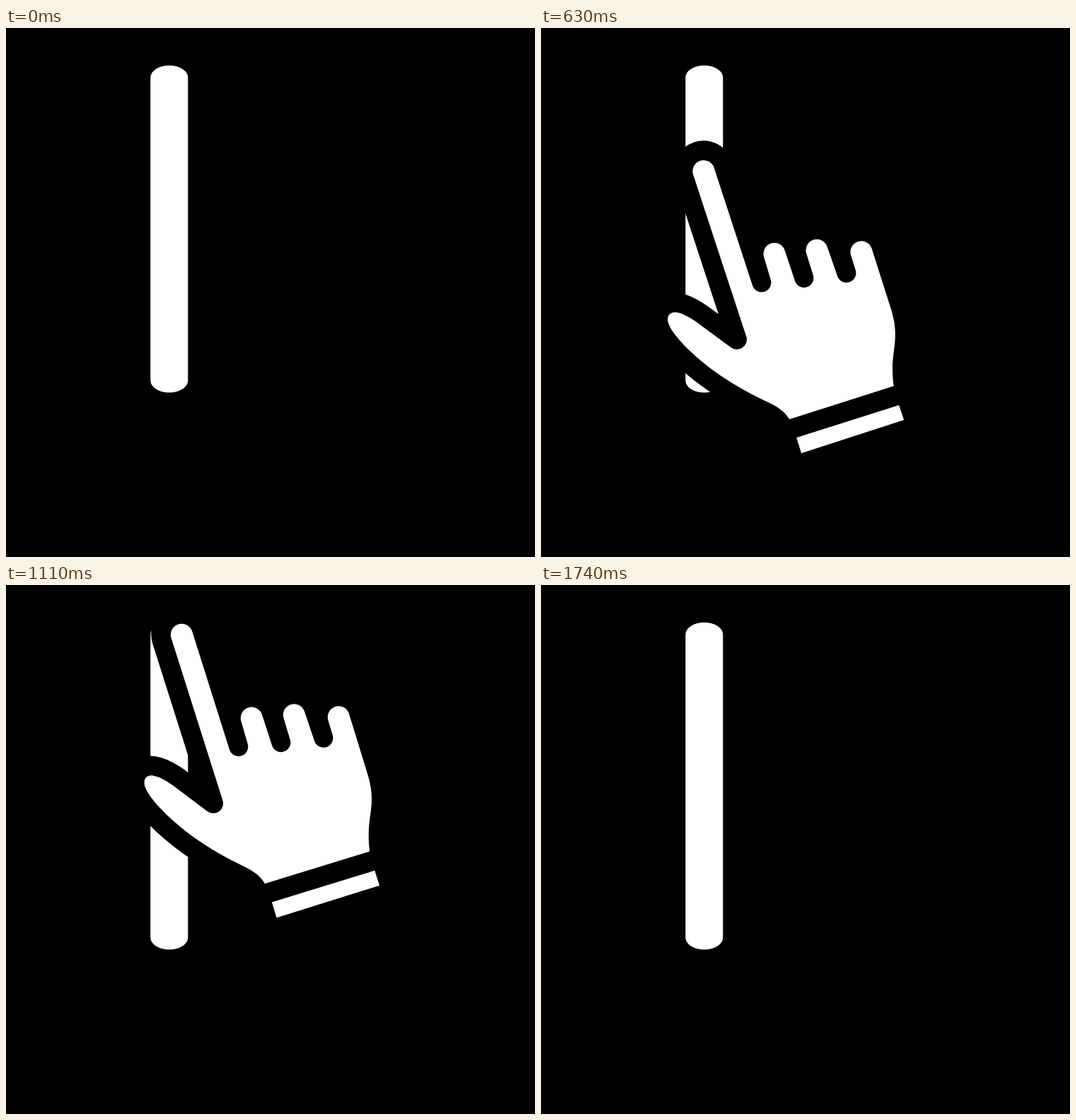
Write an HTML page that moves like this. It is 748 by 748 pixels and loops after 1830 ms.

```html
<!DOCTYPE html>
<html>
<head>
<meta charset="utf-8">
<style>
html, body { margin: 0; height: 100%; overflow: hidden; background: #000; }
svg { display: block; width: 100%; height: 100%; }
#hand { fill: #fff; stroke: #000; stroke-width: 55; stroke-linejoin: round; paint-order: stroke; }
</style>
</head>
<body>
<svg viewBox="0 0 748 748">
  <rect x="204.3" y="53" width="53" height="462.5" rx="26.5" ry="17" fill="#fff"/>
  <g id="hand">
    <path d="M216 256A15.5 15.5 0 0 1 245.5 246.3
      L300.2 413.7A13.5 13.5 0 0 0 325.8 405.3
      L315.8 371.8A15.5 15.5 0 0 1 345.2 362.2
      L360.2 407.2A13.5 13.5 0 0 0 385.8 398.8
      L375.8 366.8A15.5 15.5 0 0 1 405.2 357.2
      L420.2 400.2A13.5 13.5 0 0 0 445.8 391.8
      L438.8 369.3A15.5 15.5 0 0 1 468.2 359.7
      L496 447C502 467 502.5 480 501 495C499 515 496 525 499.5 555
      L352 602C345 591 337 585 320 577C275 556 235 530 203 497
      C188 481 180 469 180 461C180 453 186 449.5 193 451C201 452 211 458 220 464
      L269.5 500.5A14 14 0 0 0 291.3 485.5Z
      M362 628L507 582L514 603L369 650Z"/>
  </g>
</svg>
<script>
const LOOP = 1830, STEP = 30, FADE = 210, END = 1740, TURN = 1110;
const PIVOT = [299.75, 442.5];
const hand = document.getElementById('hand');
const clamp = v => Math.min(1, Math.max(0, v));

// Sideways: a slight drift, a quick start, then a decelerating swipe
function posX(t) {
  if (t >= TURN) {
    const s = t - TURN;
    return 315.5 + 0.3237 * s - 1.98e-4 * s * s;
  }
  const drift = 1.75 * clamp((t - 390) / 510);
  return PIVOT[0] - drift + 0.00216 * Math.max(0, t - 1020) ** 2;
}

// Upwards: accelerate, run evenly, settle at the top
function posY(t) {
  if (t >= TURN) {
    const s = t - TURN;
    return 262.3 - 0.28 * s * Math.exp(-s / 40);
  }
  const rise = t < 630 ? 67.7 * (t / 630) ** 2.65 : 67.7 + 0.2745 * (t - 630);
  return 461.5 - rise;
}

function draw(now) {
  const t = Math.floor(now % LOOP / STEP) * STEP;
  const x = posX(t), y = posY(t);
  const turn = 0.0605 * Math.max(0, x - 306);
  hand.setAttribute('transform',
    `translate(${x} ${y}) rotate(${turn}) translate(${-PIVOT[0]} ${-PIVOT[1]})`);
  hand.setAttribute('opacity', clamp(Math.min(t, END - t) / FADE));
}

const start = performance.now();
function tick() {
  draw(performance.now() - start);
  requestAnimationFrame(tick);
}
tick();
</script>
</body>
</html>
```
